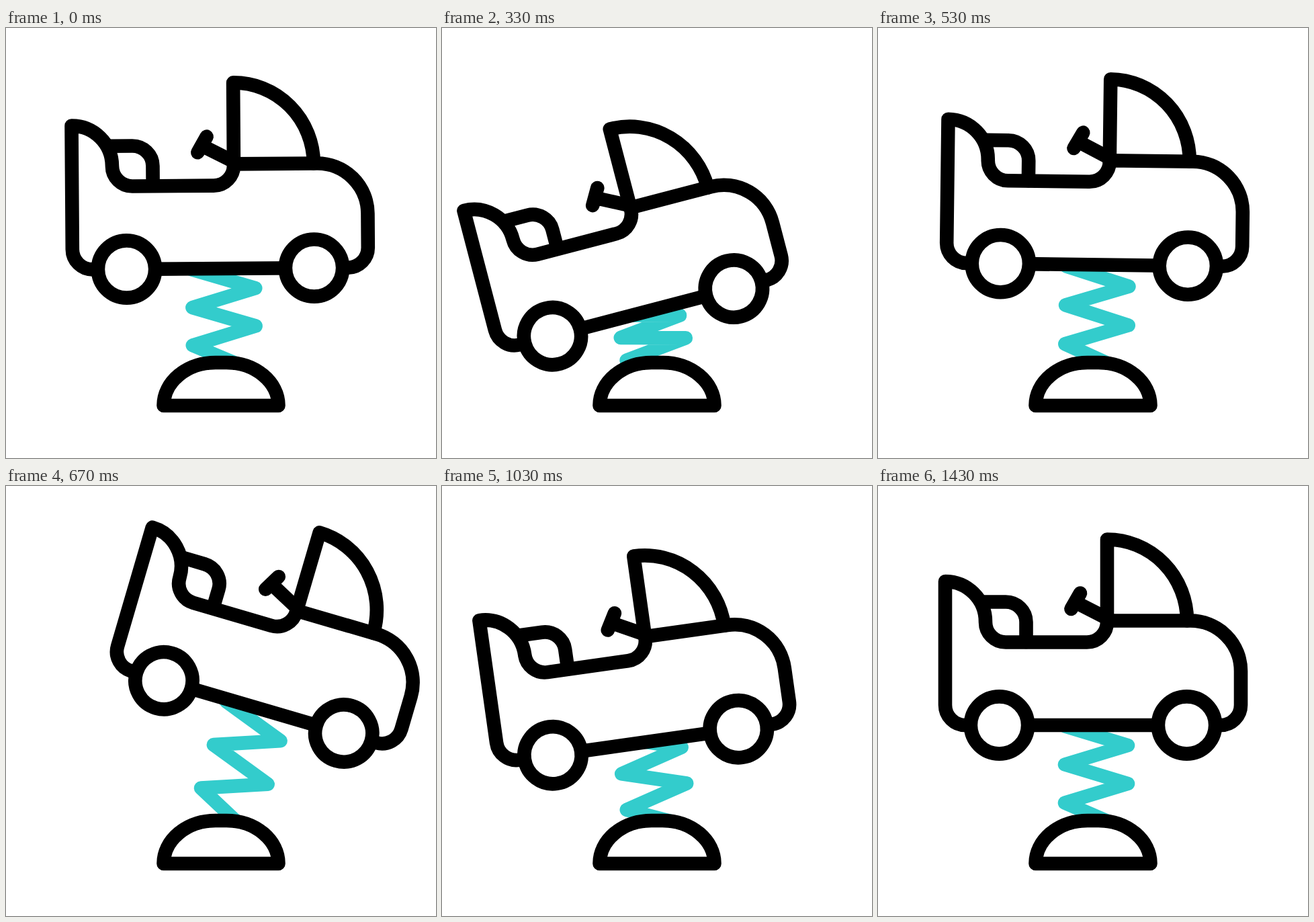
Write an HTML page that moves like this. It is 640x640 px and loops after 1.67 s.

```html
<!DOCTYPE html>
<html lang="en">
<head>
<meta charset="utf-8">
<title>Spring rider</title>
<style>
html, body { margin: 0; width: 100%; height: 100%; overflow: hidden; background: #fff; }
svg { display: block; width: 100vw; height: 100vh; }
.line { fill: none; stroke: #000; stroke-width: 20.6; stroke-linecap: round; stroke-linejoin: round; }
.solid { fill: #fff; }
#spring { stroke: #3cc; }
</style>
</head>
<body>
<svg viewBox="0 0 640 640">
  <polyline id="spring" class="line"/>
  <path class="line solid" d="M234.5 562C234.5 526.7 269 498 312 498H328C371 498 405.5 526.7 405.5 562Z"/>
  <g id="car" class="line">
    <path class="solid" d="M130 356A30 30 0 0 1 100 326V142A60 60 0 0 1 160 202A30 30 0 0 0 190 232.5H311A30 30 0 0 0 341 202V200.5H465A75 75 0 0 1 540 275.5V326A30 30 0 0 1 510 356Z"/>
    <path d="M341 202V79.5A119 121 0 0 1 460 200.5"/>
    <path d="M157 172.5H190A30.5 30 0 0 1 220.5 202.5V232"/>
    <path d="M287.5 183L301 159.5M297 174.5L338 195.5"/>
    <circle class="solid" cx="180.5" cy="356" r="42.6"/>
    <circle class="solid" cx="459.5" cy="356" r="42.6"/>
  </g>
</svg>
<script>
const LOOP = 1670, FPS = 30;
const spring = document.getElementById('spring');
const car = document.getElementById('car');

// Each swing is a list of [step, value] turning points
const angle = swing([-1.2, 0], [11.1, -15], [21.1, 17.4], [22.3, 17.4], [32.6, -9.8], [43, 0]);
const height = swing([-1.2, 143], [10, 84.2], [19.3, 171.5], [28.2, 120], [43, 143]);
const stretch = swing([-1.2, 1], [10, 0.61], [19.3, 1.18], [30.5, 0.95], [43, 1]);

// Ease in and out between neighbouring turning points
function swing(...points) {
  return step => {
    const i = points.findIndex(p => p[0] > step);
    if (i < 0) return points[points.length - 1][1];
    const [s0, v0] = points[i - 1], [s1, v1] = points[i];
    const u = (step - s0) / (s1 - s0);
    return v0 + (v1 - v0) * u * u * (3 - 2 * u);
  };
}

const rad = deg => deg * Math.PI / 180;

// Zigzag around a foot at (343, 500), sheared when squashed
function coil(tilt, scale) {
  const lean = rad(tilt), roll = lean * Math.min(1, scale ** 0.75);
  const points = [];
  for (let i = 0; i < 6; i++) {
    const x = i === 5 ? 1 : i % 2 ? 29 : -65;
    const y = -28.5 * (5 - i) * scale;
    points.push([
      343 + x * Math.cos(roll) - y * Math.sin(lean),
      500 + x * Math.sin(roll) + y * Math.cos(lean)
    ]);
  }
  return points.join(' ');
}

function draw(ms) {
  // The clock advances in whole steps, rounded to 10 ms
  const step = Math.floor((Math.floor(ms / 10) * 10 + 5) * FPS / 1000);
  const tilt = angle(step);
  car.setAttribute('transform',
    `translate(342.8 499) rotate(${tilt}) translate(-342.8 ${-356 - height(step)})`);
  spring.setAttribute('points', coil(tilt, stretch(step)));
}

let start = null;
function tick(now) {
  if (start === null) start = now;
  draw((now - start) % LOOP);
  requestAnimationFrame(tick);
}
draw(0);
requestAnimationFrame(tick);
</script>
</body>
</html>
```
